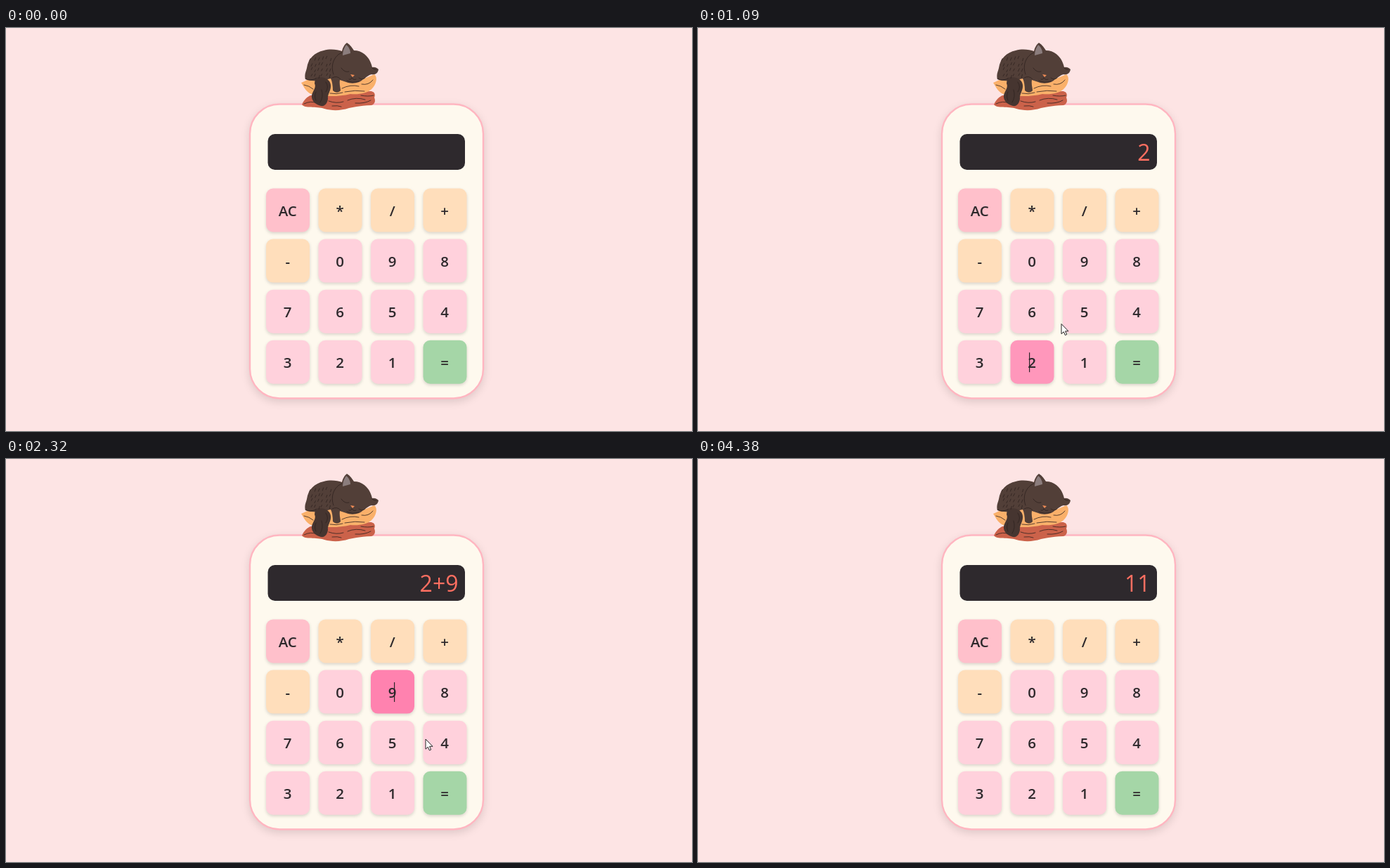
Animation, 976 px wide and 574 px high, one loop 4640 ms. Source, as an HTML page:

```html
<!DOCTYPE html>
<html lang="en">
<head>
<meta charset="utf-8">
<title>Calculator</title>
<style>
  html, body { margin: 0; width: 100%; height: 100%; overflow: hidden; background: #fde4e4; }
  svg { display: block; width: 100%; height: 100%; }
  text { font-family: "Open Sans", "Noto Sans", sans-serif; font-stretch: 75%; }
  .label { font-size: 20.5px; font-weight: 600; fill: #2e292c; text-anchor: middle; }
  #readout { font-size: 32px; font-weight: 500; fill: #ff6f61; text-anchor: end; }
  .key { filter: drop-shadow(0 2px 2px rgba(0, 0, 0, .15)); }
  .card { filter: drop-shadow(0 4px 6px rgba(0, 0, 0, .12)); }
  .line { fill: none; stroke: #2f2320; stroke-width: .8; stroke-linecap: round; }
</style>
</head>
<body>
<svg viewBox="0 0 976 574">
  <rect width="976" height="574" fill="#fde4e4"/>
  <rect class="card" x="347" y="108.5" width="332" height="419" rx="42" fill="#fef9ee" stroke="#ffb6c1" stroke-width="2.4"/>

  <g id="cat">
    <path fill="#cb624a" d="M421 109C423 104 427 99 433 96L518 90C524 90 526 94 524 99C526 104 525 108 520 110C508 110 498 112 488 114C476 118 464 118 453 115C441 111 425 115 421 109Z"/>
    <path class="line" d="M424 108Q434 103 442 107M459 104Q470 108 480 105M486 103Q498 98 511 102M497 107Q510 108 519 103M464 111Q472 110 477 112M505 96Q515 98 523 96"/>
    <path fill="#fab06a" d="M420 78C430 74 437 69 447 70L505 74L524 66C529 70 527 79 522 85C516 93 503 95 490 94C470 99 448 97 434 94C427 91 424 84 420 78Z"/>
    <path class="line" d="M424 81Q431 82 437 87M478 86Q490 80 502 83M482 91Q497 88 510 90M506 80Q516 82 522 74M461 93Q470 95 479 92"/>
    <path fill="#523f38" d="M426 73C424 66 427 62 428 57C430 43 439 35 452 32C462 29 472 31 478 33C479 28 482 23 485 21C490 24 493 29 495 32C508 32 518 42 521 56C525 55 528 57 530 59C529 64 526 67 520 66C516 67 513 70 508 73C503 79 491 80 484 77L475 74C474 80 476 86 476 89C473 93 468 92 465 89C465 82 464 76 462 72C450 75 434 77 426 73Z"/>
    <path fill="#463530" d="M440 71C450 68 461 72 462 81C463 89 457 94 458 101C457 108 453 112 448 111C440 109 434 103 435 96C436 90 442 85 439 79Z"/>
    <path fill="#8b7d7d" d="M484 24C488 27 490 32 490 36L479 39C479 33 481 28 484 24Z"/>
    <path class="line" d="M466 66C461 53 467 39 478 35M464 71Q471 67 476 73M477 57Q482 64 488 62M502 71Q507 75 511 71M521 57Q524 60 527 59M485 75Q493 79 502 76M426 72Q432 76 441 72M455 77Q460 84 455 91M449 88Q452 98 447 106M441 91Q438 97 441 103"/>
    <path fill="#ef8b55" d="M490 66L496 67L493 70Z"/>
    <path class="line" d="M492 71Q491 74 488 73M492 71Q495 75 498 73" stroke-width=".6"/>
  </g>

  <rect x="372.5" y="151" width="280.5" height="51" rx="10" fill="#2e292d"/>
  <text id="readout" x="643.5" y="189"></text>
  <g id="keys"></g>
  <rect id="caret" width="1.2" height="28" fill="#2b2528"/>

  <g id="pointer">
    <path id="handFill" fill="#fff"/>
    <circle id="ring" r="12" fill="#c0e136" opacity=".93"/>
    <path id="handLine" fill="none" stroke="#222" stroke-width="1.1" stroke-linejoin="round"/>
    <path id="arrow" d="M0 0V14.2L3.3 11.2L5.4 16L7.7 15L5.6 10.3H10Z" fill="#fff" stroke="#222" stroke-width="1" stroke-linejoin="round"/>
  </g>
</svg>
<script>
const LOOP = 4640, STEP = 70, SIDE = 62, FADE = 300, BLINK = 530;
const $ = id => document.getElementById(id);

function make(tag, attrs, parent) {
  const el = document.createElementNS('http://www.w3.org/2000/svg', tag);
  for (const k in attrs) el.setAttribute(k, attrs[k]);
  parent.appendChild(el);
  return el;
}

// Colours at rest and under the pointer
const PINK = [[255, 209, 220], [255, 128, 174]];
const PEACH = [[255, 222, 187], [255, 203, 153]];
const GREEN = [[165, 214, 167], [129, 199, 132]];
const ROSE = [[255, 192, 203], [255, 160, 180]];

const keys = {};
[...['AC'], ...'*/+-0987654321='].forEach((name, i) => {
  const x = 370 + (i % 4) * 74.5, y = 228.5 + Math.floor(i / 4) * 72.1;
  const g = make('g', {}, $('keys'));
  const rect = make('rect', { class: 'key', x, y, width: SIDE, height: SIDE, rx: 10 }, g);
  const label = make('text', { class: 'label', x: x + SIDE / 2 - .3, y: y + 39 }, g);
  label.textContent = name;
  const tone = name === 'AC' ? ROSE : name === '=' ? GREEN : '*/+-'.includes(name) ? PEACH : PINK;
  keys[name] = { x, y, g, rect, tone };
});

// Short hairs scattered over the back
let seed = 7;
const rand = () => (seed = seed * 16807 % 2147483647) / 2147483647;
let fur = '';
for (let i = 0; i < 24; i++) {
  const x = 433 + (i % 6) * 5.4 + rand() * 3, y = 40 + Math.floor(i / 6) * 8 + rand() * 4;
  fur += `M${x} ${y}l${-1 - rand()} ${2.5 + rand() * 2}`;
}
make('path', { class: 'line', d: fur }, $('cat'));

const HAND = 'M-1.6 1.5C-1.6-.6 1.6-.6 1.6 1.5V7C2-.0 0 0 1.6 7C1.8 5.3 4.4 5.3 4.6 7.3C5 6 7.2 6.3 7.3 8C8 7.2 9.8 7.6 9.8 9.4V13.5C9.8 15 8.6 16.4 8.4 19.6H-.4C-.6 17.4-4 14.5-5.4 11.6C-6.2 9.8-4.2 8.8-3 10.2L-1.6 12Z'
  .replace('C2-.0 0 0 1.6 7', '');
$('handFill').setAttribute('d', HAND);
$('handLine').setAttribute('d', HAND + 'M1.6 7V10.5M4.6 7.3V10.5M7.3 8V11');

// Stretches of time in which the picture refreshes
const bursts = [[190, 680], [810, 1300], [1370, 1860], [1920, 2390], [2460, 2870], [3220, 3850], [4380, 4380]];
// Pointer path: time, x, y
const path = [
  [190, 731, 516], [400, 540, 500], [470, 488, 482], [610, 474, 473], [1020, 474, 473],
  [1160, 560, 370], [1300, 622, 271], [1620, 622, 271], [1860, 556, 330], [2250, 556, 330],
  [2320, 597, 399], [2390, 644, 485], [3220, 644, 485], [3360, 590, 440], [3500, 483, 307],
  [3570, 492, 327], [3640, 560, 400], [3710, 640, 490], [3780, 699, 556]
];
// Key, pointer enters, pointer leaves
const hovers = [['2', 445, 1040], ['+', 1180, 1660], ['9', 1800, 2315], ['=', 2390, 3370], ['0', 3450, 3550]];
// Key, press, release, caret x, readout afterwards
const clicks = [
  ['2', 880, 950, 471, '2'], ['+', 1440, 1580, 620, '2+'],
  ['9', 1920, 2110, 552, '2+9'], ['=', 2730, 2800, 629.5, '11']
];

const clamp = v => Math.max(0, Math.min(1, v));
const ease = v => { const p = clamp(v); return 1 - (1 - p) ** 3 * (1 + 1.4 * p); };

function snap(t) {
  let held = 0;
  for (const [from, to] of bursts) {
    if (t < from) break;
    held = t >= to ? to : Math.max(from, to - Math.ceil((to - t) / STEP) * STEP);
  }
  return held;
}

function pointerAt(t) {
  const i = path.findIndex(p => p[0] > t);
  if (i < 0) return path[path.length - 1].slice(1);
  const [t0, x0, y0] = path[i - 1], [t1, x1, y1] = path[i];
  const p = (t - t0) / (t1 - t0);
  return [x0 + (x1 - x0) * p, y0 + (y1 - y0) * p];
}

function drawKeys(t, pressed) {
  for (const name in keys) {
    const { x, y, g, rect, tone } = keys[name];
    const hover = hovers.find(h => h[0] === name);
    let amount = 0;
    if (hover) {
      amount = ease((Math.min(t, hover[2]) - hover[1]) / FADE) * (1 - ease((t - hover[2]) / FADE));
    }
    const rgb = tone[0].map((c, i) => Math.round(c + (tone[1][i] - c) * amount));
    rect.setAttribute('fill', `rgb(${rgb})`);
    const cx = x + SIDE / 2, cy = y + SIDE / 2;
    g.setAttribute('transform', name === pressed
      ? `translate(${cx} ${cy}) scale(.97) translate(${-cx} ${-cy})` : '');
  }
}

function drawPointer(t, pressed) {
  const shown = t >= 190 && t < 3850;
  $('pointer').style.display = shown ? '' : 'none';
  if (!shown) return;
  const [x, y] = pointerAt(t);
  const inset = 5;
  const over = Object.values(keys).some(k =>
    x > k.x + inset && x < k.x + SIDE - inset && y > k.y + inset && y < k.y + SIDE - inset);
  $('pointer').setAttribute('transform', `translate(${x} ${y})`);
  $('handFill').style.display = $('handLine').style.display = over ? '' : 'none';
  $('arrow').style.display = over ? 'none' : '';
  $('ring').style.display = pressed ? '' : 'none';
}

function drawCaret(t, click) {
  const last = click && click[0] === '=';
  const start = last ? 2790 : click ? click[1] : 0;
  const on = click && (t < start || Math.floor((t - start) / BLINK) % 2 === 0);
  $('caret').style.display = on ? '' : 'none';
  if (!on) return;
  $('caret').setAttribute('x', click[3]);
  $('caret').setAttribute('y', keys[click[0]].y + 17.4);
}

function draw(time) {
  const t = snap(time);
  const click = clicks.filter(c => t >= c[1]).pop();
  const done = clicks.filter(c => t >= c[2]).pop();
  const pressed = click && t < click[2] ? click[0] : '';
  drawKeys(t, pressed);
  drawPointer(t, pressed);
  drawCaret(t, click);
  $('readout').textContent = done ? done[4] : '';
}

const begin = performance.now();
function tick() {
  draw((performance.now() - begin) % LOOP);
  requestAnimationFrame(tick);
}
tick();
</script>
</body>
</html>
```
